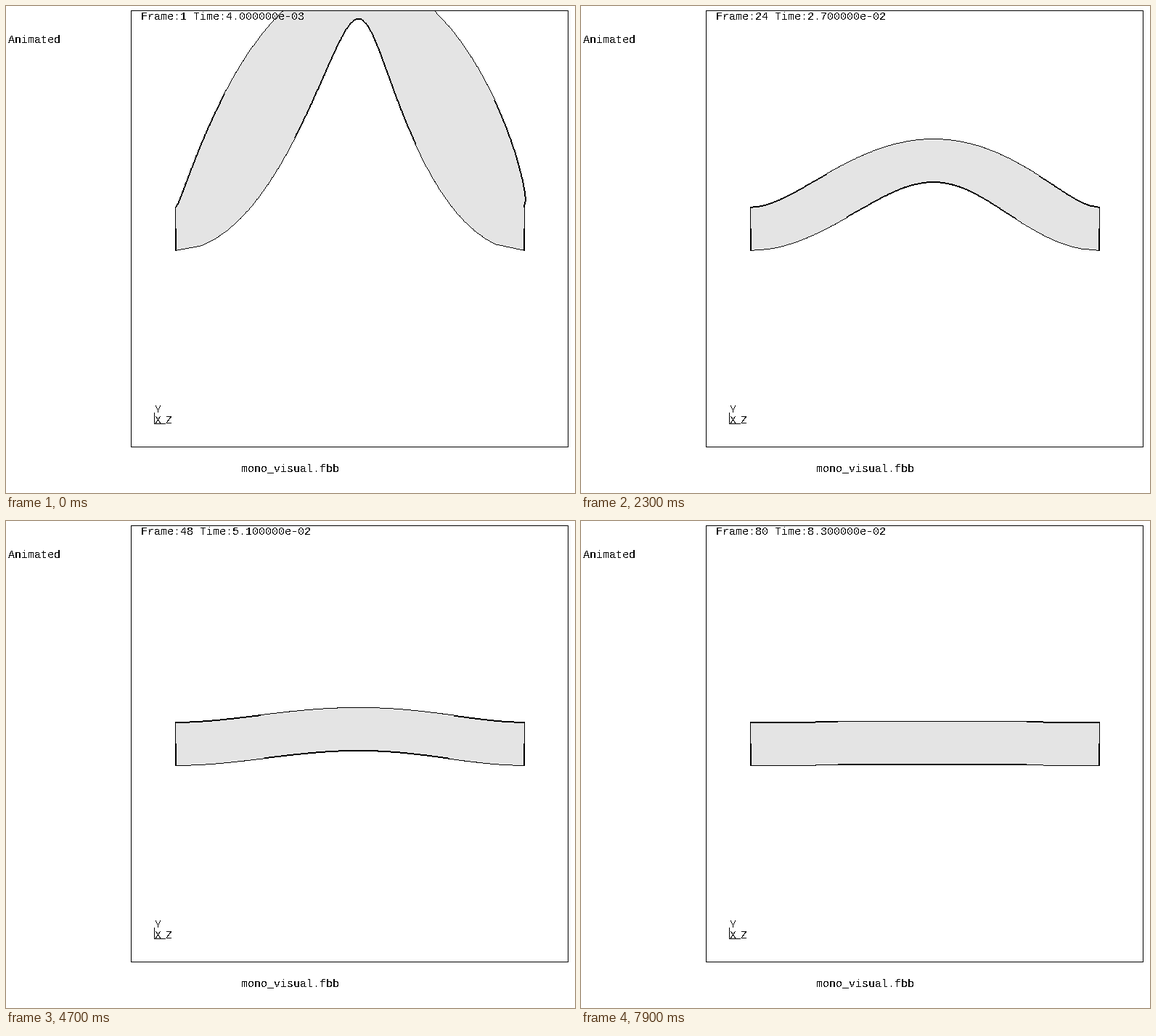
Recreate the animation shown at these times as a matplotlib script. Size 784 px wide and 672 px high, loop 8000 ms.

```python
import numpy as np
import matplotlib as mpl
import matplotlib.pyplot as plt
from matplotlib.animation import FuncAnimation
from matplotlib.patches import Polygon, Rectangle

mpl.rcParams.update({
    "font.family": "Liberation Mono",
    "text.antialiased": False,
    "text.hinting": "native",
    "text.hinting_factor": 1,
    "path.simplify": False,
})

W, H, DPI = 784, 672, 100
PX = 72 / DPI
FRAMES, STEP = 80, 100
LEFT, RIGHT, TOP, BOTTOM = 233.7, 714.2, 277.4, 337.4
SPAN = RIGHT - LEFT
FINE = 4  # subdivisions of each of the 24 elements, except the two end ones
INFLECT = 5 * FINE + 1, 18 * FINE + 1


def mode(u, beta, sigma, peak):
    """Clamped-clamped beam mode and its slope, scaled to a unit peak."""
    b = beta * u
    f = np.cosh(b) - np.cos(b) - sigma * (np.sinh(b) - np.sin(b))
    d = beta * (np.sinh(b) + np.sin(b) - sigma * (np.cosh(b) - np.cos(b)))
    return f / peak, d / peak


u = np.r_[0, np.linspace(1 / 24, 23 / 24, 22 * FINE + 1), 1]
X = LEFT + SPAN * u
f1, d1 = mode(u, 4.730041, 0.982502, 1.5882)
f2, d2 = mode(u, 7.853205, 1.000777, 1.508)
SKEW = 0.056
shape = (f1 - SKEW * f2) / 1.0045
slope = (d1 - SKEW * d2) / 1.0045 / SPAN


def deflection(n):
    """Damped ringing sampled close to half its period, so it flips each step."""
    env = np.exp(np.interp(n, [0, 1, 9, 16, 23, 31, 47, 63, 79],
                           np.log([368.4, 321, 198, 140, 100, 62.4, 20, 5, 1.3])))
    phase = np.pi - np.radians(150) * np.exp(-n / 11.5)
    return env * np.cos(np.pi * n + phase)


def edges(a):
    """Upper and lower outlines; the sections tilt with the slope."""
    top = np.column_stack([X - 27.6 * a * slope, TOP - a * shape])
    low = np.column_stack([X + 23.1 * a * slope, BOTTOM - a * shape])
    return top, low


def pixels(path, inset=0):
    """Pixels along a clockwise path, optionally moved inwards."""
    out = []
    for p, q in zip(path[:-1], path[1:]):
        dx, dy = q - p
        steps = int(max(abs(dx), abs(dy))) + 1
        pts = p + np.linspace(0, 1, steps + 1)[:, None] * (q - p)
        normal = (0, np.sign(dx)) if abs(dx) >= abs(dy) else (-np.sign(dy), 0)
        out.append(np.floor(pts) + inset * np.array(normal))
    return np.vstack(out)


fig = plt.figure(figsize=(W / DPI, H / DPI), dpi=DPI, facecolor="white")
ax = fig.add_axes([0, 0, 1, 1])
ax.set(xlim=(0, W), ylim=(H, 0))
ax.axis("off")


def line(xs, ys, **kw):
    # without antialiasing a hairline fills exactly one pixel
    return ax.plot(xs, ys, color="black", lw=0.4 * PX, antialiased=False,
                   snap=False, **kw)[0]


def label(x, y, s):
    return ax.text(x, y, s, size=15 * PX, color="black", va="baseline", zorder=5)


clip = Rectangle((172.5, 6.5), 602, 602, fc="none", ec="none")
body = Polygon(np.zeros((3, 2)), fc="#e4e4e4", ec="none", zorder=1)
outline = line([], [], solid_capstyle="butt", zorder=2)
ax.add_patch(clip)
ax.add_patch(body)
for art in (body, outline):
    art.set_clip_path(clip)

line([172.5, 774.5, 774.5, 172.5, 172.5], [6.5, 6.5, 608.5, 608.5, 6.5], zorder=4)

# axis triad
line([204.5, 204.5, 219.5], [561.5, 576.5, 576.5], zorder=4)
label(205, 561, "Y")
label(205, 576, "X")
label(220, 576, "Z")

label(3, 51, "Animated")
label(324, 642, "mono_visual.fbb")
clock = label(186, 19, "")

MID = (TOP + BOTTOM) / 2
SIDES = [np.array([[RIGHT, MID], [RIGHT, BOTTOM]]),
         np.array([[LEFT, BOTTOM], [LEFT, MID]])]


def update(n):
    a = deflection(n)
    top, low = edges(a)
    low = low[::-1]
    ring = np.vstack([top, low, top[:1]])
    body.set_xy(ring)

    # concave stretches of the outline are two pixels wide
    i, j = INFLECT
    k = len(X) - 1
    if a > 0:
        heavy = [top[:i + 1], top[j:], low[k - j:k - i + 1]]
    else:
        heavy = [top[i:j + 1], low[:k - j + 1], low[k - i:]]
    dots = np.vstack([pixels(ring)] + [pixels(p, 1) for p in heavy + SIDES])
    dots = np.unique(dots, axis=0)
    x, y = dots.T
    gap = np.full(len(x), np.nan)
    outline.set_data(np.column_stack([x + 0.3, x + 0.7, gap]).ravel(),
                     np.column_stack([y + 0.5, y + 0.5, gap]).ravel())
    clock.set_text(f"Frame:{n + 1} Time:{(n + 4) / 1000:.6e}")
    return body, outline, clock


anim = FuncAnimation(fig, update, frames=FRAMES, interval=STEP,
                     init_func=lambda: update(0), repeat=True, repeat_delay=0)
plt.show()
```
